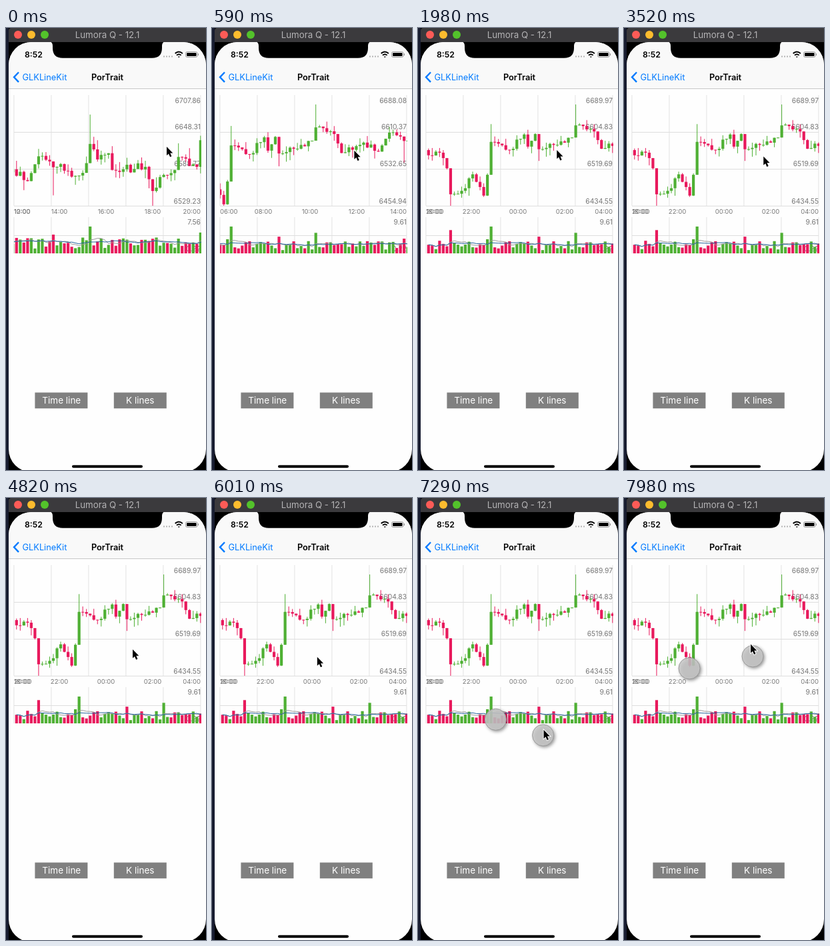
Write an HTML page with a canvas that moves like this. It is 300 by 659 pixels and loops after 8000 ms.

```html
<!DOCTYPE html>
<html lang="en">
<head>
<meta charset="utf-8">
<style>
  html, body { margin: 0; width: 100%; height: 100%; overflow: hidden; background: #000; }
  svg, canvas { position: absolute; left: 0; top: 0; }
  text { font-family: Inter, Roboto, sans-serif; }
</style>
</head>
<body>
<svg width="300" height="659" viewBox="0 0 300 659">
  <rect width="4" height="659" fill="#171c30"/>
  <rect x="4" width="296" height="659"/>
  <path d="M4 21V4q0-4 4-4h292v21z" fill="#3b3a3d"/>
  <circle cx="18" cy="10" r="6" fill="#fc5b57"/>
  <circle cx="38" cy="10" r="6" fill="#fdbc2e"/>
  <circle cx="58" cy="10" r="6" fill="#53c22b"/>
  <text x="152" y="15" font-size="13.3" text-anchor="middle" fill="#b4b3b5">Lumora Q - 12.1</text>
  <clipPath id="screen"><rect x="4" y="21" width="296" height="641" rx="34"/></clipPath>
  <g clip-path="url(#screen)">
    <rect x="4" y="21" width="296" height="641" fill="#fefefe"/>
    <rect x="4" y="21" width="296" height="69" fill="#f9f9f9"/>
    <path d="M4 90.5h296" stroke="#c9c9c9"/>
    <path d="M65 20q5 1 5 7v2.7q0 15 15 15h134q15 0 15-15v-2.700q0-6 5-7z"/>
  </g>
  <text x="28" y="43.5" font-size="12.2" font-weight="600">8:52</text>
  <path d="M236 42.5h14" stroke="#b5b5b5" stroke-width="2" stroke-dasharray="2 2"/>
  <path d="M253.7 38q5.6-5 11.2 0M255.9 40.7q3.4-3 6.8 0" fill="none" stroke="#000" stroke-width="1.8"/>
  <path d="M259.3 44.2l-1.6-1.8h3.2z"/>
  <rect x="269.5" y="35.5" width="17.5" height="8" rx="2.3" fill="none" stroke="#999"/>
  <rect x="271" y="37" width="14.5" height="5" rx="1"/>
  <path d="M288.5 38v3" stroke="#999"/>
  <path d="M19 66l-7 7.3 7 7.3" fill="none" stroke="#007aff" stroke-width="2.4"/>
  <text x="24.5" y="78" font-size="12.8" fill="#007aff">GLKLineKit</text>
  <text x="152" y="78" font-size="12.8" font-weight="600" text-anchor="middle">PorTrait</text>
  <g fill="#808080">
    <rect x="43.4" y="543.5" width="79" height="23.7"/>
    <rect x="161.8" y="543.5" width="79" height="23.7"/>
  </g>
  <g fill="#fff" font-size="13.5" text-anchor="middle">
    <text x="83.3" y="560">Time line</text><text x="201.3" y="560">K lines</text>
  </g>
  <rect x="99" y="651.8" width="106" height="4" rx="2"/>
</svg>
<canvas id="stage" width="300" height="659"></canvas>
<script>
const ctx = document.getElementById('stage').getContext('2d');
const LOOP = 8000, STEP = 5.52, START = 54, COUNT = 106;
const LEFT = 12, RIGHT = 292, TOP = 100, BASE = 265, VOL_BASE = 336;
const GREEN = '#4fb034', RED = '#e81a5d', GREY = '#777';

// Turning points of the price: [candle, price]
const trend = [[0,6551],[3,6557],[5,6521],[6,6461],[9,6469],[12,6507],[15,6458],[16,6506],[17,6582],
  [22,6563],[26,6599],[27,6571],[29,6600],[30,6565],[36,6583],[39,6592],[40,6620],[45,6606],[47,6566],[53,6588],
  [57,6569],[60,6609],[65,6592],[71,6578],[73,6598],[74,6629],[76,6604],[79,6614],[80,6587],
  [89,6592],[91,6553],[94,6579],[97,6587],[98,6608],[103,6592],[104,6635],[105,6675]];
// Prices touched by the few long wicks
const spikes = { 6: 6434.55, 17: 6623, 30: 6538, 40: 6668.3, 64: 6546, 74: 6676.4, 91: 6529.23, 98: 6630, 105: 6692.7 };

// Paths of the pointer, one finger, and the point the second finger mirrors: [time, x, y]
const cursorPath = [[60,241,177],[810,202,185],[1030,214,184],[2510,205,181],[3360,204.5,181],[3650,213,200],
  [3900,207,231],[4100,190,228],[5060,190,225],[5290,157.5,239],[6380,158,236],[6830,191.5,242],
  [7060,262,291],[7290,188.5,346],[7440,200,301],[7980,190,218]];
const touchPath = [[6480,170,228],[6830,182,231],[7080,266,282],[7290,187.5,354],[7480,200,303],[7620,199.5,333],[7980,193,236]];
const centrePath = [[7620,152,342],[7980,145.5,245]];

const noise = n => { const v = Math.sin(n * 127.1) * 43758.5453; return v - Math.floor(v); };

function along(keys, t) {
  const n = keys.findIndex(k => k[0] >= t);
  if (n < 1) return keys.at(n).slice(1);
  const a = keys[n - 1], b = keys[n], u = (t - a[0]) / (b[0] - a[0]);
  return a.slice(1).map((v, k) => v + (b[k + 1] - v) * u);
}

const closeAt = i => along(trend, i)[0] + (trend.some(k => k[0] === i) ? 0 : 14 * noise(i) - 7);
const bars = Array.from({ length: COUNT }, (_, i) => {
  const open = i ? closeAt(i - 1) : 6563, close = closeAt(i), spike = spikes[i];
  const wick = seed => spike ? 0 : 18 * noise(i + seed) ** 2;
  const high = Math.max(open, close, spike || 0) + wick(200);
  const low = Math.min(open, close, spike || Infinity) - wick(400);
  const vol = Math.min(7.12, Math.max((high - low) / 14, .8 + 2.6 * noise(i + 600)));
  return { i, open, close, high, low, vol };
});
const average = (i, n) => {
  const part = bars.slice(Math.max(0, i - n + 1), i + 1);
  return part.reduce((sum, b) => sum + b.vol, 0) / part.length;
};

function line(color, ...points) {
  ctx.strokeStyle = color;
  ctx.lineWidth = 1;
  ctx.beginPath();
  points.forEach(([x, y]) => ctx.lineTo(x, y));
  ctx.stroke();
}

function label(str, x, y, size = 10.3, align = 'right') {
  ctx.font = `${size}px Inter, Roboto, sans-serif`;
  ctx.textAlign = align;
  ctx.fillStyle = GREY;
  ctx.fillText(str, x, y);
}

function drawGrid() {
  for (let x = 11.9; x < 300; x += 56) {
    line('#e2e2e2', [x, TOP], [x, BASE]);
    line('#e2e2e2', [x, 282], [x, VOL_BASE]);
  }
  for (const y of [155.5, 210.5, 265.5, 309.5]) line('#dedede', [LEFT, y], [RIGHT, y]);
}

function drawTimes(offset) {
  const hour = offset > 2.3 ? 2 * Math.round(2 + 4 * (offset - 4.62) / 49.4) : -4;
  const clock = h => String((h + 24) % 24).padStart(2, '0') + ':00';
  const settled = offset === 0 || offset === START;
  label(clock(hour), LEFT, 277, 9.5, 'left');
  if (settled) label(clock(hour - 2), LEFT, 277, 9.5, 'left');
  for (let k = 1; k < 4; k++) label(clock(hour + 2 * k), 10 + 70 * k - (settled ? 0 : 3), 277, 9.5, 'center');
  label(clock(hour + 8), RIGHT, 277, 9.5);
}

function drawChart(offset) {
  const shown = bars.map(b => ({ ...b, x: 15.8 + (b.i - offset) * STEP })).filter(b => b.x > 9 && b.x < 300);
  const low = Math.min(...shown.map(b => b.low)), high = Math.max(...shown.map(b => b.high));
  const range = (high - low) * 165 / 151, volMax = Math.max(...shown.map(b => b.vol)) * 1.35;
  const yOf = p => BASE - (p - low) / range * 165;
  const volY = v => VOL_BASE - v / volMax * 54;

  drawGrid();
  [112, 151, 206, 262].forEach((y, k) => label((low + range * (3 - k) / 3).toFixed(2), RIGHT, y));
  label(volMax.toFixed(2), RIGHT, 293);
  label('0.22', RIGHT, 333);
  drawTimes(offset);

  ctx.save();
  ctx.beginPath();
  ctx.rect(LEFT, TOP, RIGHT - LEFT + 1, VOL_BASE - TOP);
  ctx.clip();
  for (const b of shown) {
    const top = yOf(Math.max(b.open, b.close)), bottom = yOf(Math.min(b.open, b.close));
    ctx.fillStyle = b.close >= b.open ? GREEN : RED;
    ctx.fillRect(b.x - 2.1, top, 4.2, Math.max(1, bottom - top));
    ctx.fillRect(b.x - .5, yOf(b.high), 1, yOf(b.low) - yOf(b.high));
    ctx.fillRect(b.x - 2.1, volY(b.vol), 4.2, VOL_BASE - volY(b.vol));
  }
  line('#999', ...shown.map(b => [b.x, volY(average(b.i, 5))]));
  line('#24649c', ...shown.map(b => [b.x, volY(average(b.i, 10))]));
  ctx.restore();
}

function drawTouch(x, y) {
  ctx.save();
  ctx.shadowColor = 'rgba(0,0,0,.5)';
  ctx.shadowBlur = 5;
  ctx.shadowOffsetX = ctx.shadowOffsetY = 2;
  ctx.fillStyle = 'rgba(200,200,200,.85)';
  ctx.beginPath();
  ctx.arc(x, y, 16, 0, 7);
  ctx.fill();
  ctx.shadowColor = 'transparent';
  ctx.strokeStyle = '#999';
  ctx.stroke();
  ctx.restore();
}

function drawCursor(x, y) {
  const arrow = new Path2D('M0 0V14L3.2 11.2L5.5 16.5L8 15.4L5.7 10.2H10Z');
  ctx.save();
  ctx.translate(x, y);
  ctx.scale(.93, .93);
  ctx.lineWidth = 2;
  ctx.strokeStyle = '#fff';
  ctx.stroke(arrow);
  ctx.fillStyle = '#000';
  ctx.fill(arrow);
  ctx.restore();
}

function draw(t) {
  const glide = Math.min(1, Math.max(0, (t - 60) / 970));
  ctx.clearRect(0, 0, 300, 659);
  drawChart(START * (1 - glide) ** 1.645);
  if (t >= touchPath[0][0]) {
    const [x, y] = along(touchPath, t), [cx, cy] = along(centrePath, t);
    drawTouch(x, y);
    drawTouch(2 * cx - x, 2 * cy - y);
  }
  drawCursor(...along(cursorPath, t));
}

const start = performance.now();
function tick() {
  draw((performance.now() - start) % LOOP);
  requestAnimationFrame(tick);
}
tick();
</script>
</body>
</html>
```
